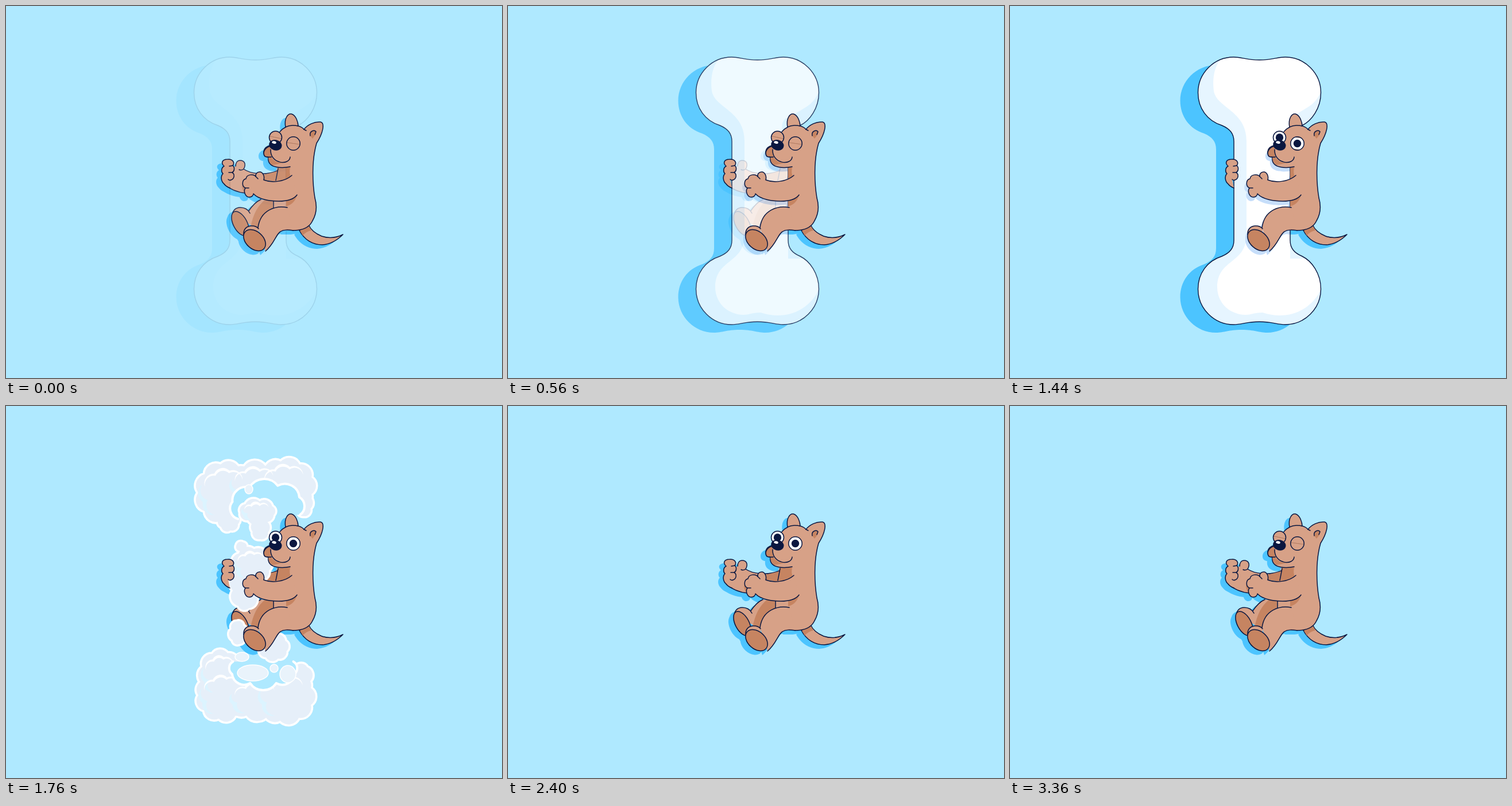
An HTML page for the animation above (3.44 s loop, 864 px wide and 648 px high).

```html
<!DOCTYPE html>
<html lang="en">
<head>
<meta charset="utf-8">
<title>Dog and bone</title>
<style>
html, body { margin: 0; width: 100%; height: 100%; overflow: hidden; background: #afe9ff; }
svg { display: block; width: 864px; height: 648px; }
</style>
</head>
<body>
<svg id="stage" viewBox="0 0 864 648" stroke-linecap="round" stroke-linejoin="round"></svg>
<script>
const LOOP = 3440, STEP = 80;
const SKY = '#afe9ff', INK = '#0a1740', SKIN = '#d7a187', DARK = '#c68461', SHADE = '#4cc4ff', MIST = '#e6eff9';
const stage = document.getElementById('stage');

function add(parent, tag, attrs = {}) {
  const node = document.createElementNS('http://www.w3.org/2000/svg', tag);
  for (const key in attrs) node.setAttribute(key, attrs[key]);
  parent.appendChild(node);
  return node;
}
const group = (parent, attrs) => add(parent, 'g', attrs);
const fill = (parent, d, color) => add(parent, 'path', { d, fill: color });
const line = (parent, d, width = 1.5, color = INK) =>
  add(parent, 'path', { d, fill: 'none', stroke: color, 'stroke-width': width });
const oval = (parent, cx, cy, rx, ry, color, turn = 0, stroke = 'none') =>
  add(parent, 'ellipse', { cx, cy, rx, ry, fill: color, stroke, 'stroke-width': 1.5, transform: `rotate(${turn} ${cx} ${cy})` });

// A part is outlined along its strokes; its fill bridges the gaps between them
const solid = d => d.replace(/(?!^)M/g, 'L');
function part(parent, d) {
  fill(parent, solid(d), SKIN);
  line(parent, d);
}

const tail = 'M511,391C520,408 535,416 551,416C566,415 578,407 587,398C575,404 562,405 550,401C538,396 530,388 527,381Z';
const ear = 'M487,211C484,196 491,187 497,188C505,190 509,202 509,210';
const body = 'M477,219C484,211 492,208 499,208C508,208 515,210 519,215C525,207 537,201 548,202C556,204 552,222 541,239'
  + 'C532,270 534,310 538,334C542,348 541,362 534,374C528,387 515,391 500,391M488,391M488,297'
  + 'M495,280C485,282 454,285 457,263M462,263C454,264 448,261 449,253C450,247 455,244 461,243';
const arm = 'M498,295C485,307 462,308 449,303C451,296 447,289 442,289C437,289 434,293 435,297C431,292 419,293 418,301'
  + 'C411,302 410,314 417,317C413,323 417,333 424,333C428,333 431,330 431,327C440,337 460,340 475,340C490,340 502,336 507,329';
const leg = 'M490,351C470,347 443,355 439,386M452,427C467,415 470,398 478,393C484,389 492,390 500,391';
const foot = 'M414,399C413,388 420,383 428,383C433,383 437,384 440,388M445,400';
const farArm = 'M473,287C452,296 425,292 414,284C419,275 415,269 408,269C403,269 400,273 400,279M388,285M380,310C392,321 406,325 418,326';
const palm = 'M390,317C387,316 383,314 380,310C375,306 373,297 378,292C375,290 374,282 380,279C374,274 376,267 386,267'
  + 'C395,266 399,273 395,278C399,281 398,288 394,290C399,293 398,301 392,303C390,304 388,303 387,302';
const farLeg = 'M422,358C428,349 435,341 444,337M466,340V353M440,390M408,370';
const farFoot = 'M394,370C393,356 400,351 408,351C416,351 422,355 425,361M420,385M414,403';
const sole = [433, 408, 22, 15], farSole = [408, 379, 23, 12];

// Bone from one quarter, mirrored both ways; the shaft sits a little to the right
const quarter = [[0, 228], [23, 228], [30, 233], [45, 233], [79, 233], [107, 205], [107, 171],
  [107, 144], [91, 122], [70, 114], [56, 108], [49, 100], [49, 86]];
const bone = [[1, -1], [1, 1], [-1, 1], [-1, -1]].map(([sx, sy], i) => {
  const pts = quarter.map(([x, y]) => [434.5 + sx * x + (y < 116 ? 4.5 : 0), 322 + sy * y]);
  if (i % 2) pts.reverse();
  return (i ? 'L' : 'M') + pts[0] + 'C' + pts.slice(1).join(' ');
}).join('') + 'Z';
const gleam = 'M374,86C356,100 352,125 355,148C360,178 412,182 412,235V398C412,450 361,440 361,490'
  + 'C361,515 380,537 410,538C420,538 425,534 440,534C490,550 530,525 544,488V440H488V215C484,175 535,190 544,138V80Z';

const defs = add(stage, 'defs');
const clip = (id, tag, attrs) => add(add(defs, 'clipPath', { id }), tag, attrs);
clip('inBone', 'path', { d: bone });

// Shadow of the whole character
const cast = group(stage, { transform: 'translate(-9 7)' });
for (const d of [tail, ear, body, arm, leg, foot, farArm, palm, farLeg, farFoot]) fill(cast, solid(d), SHADE);
oval(cast, ...sole, SHADE, 42);
oval(cast, ...farSole, SHADE, 62);

// Parts behind the bone
const rear = group(stage);
part(rear, tail);
fill(rear, 'M512,391L527,382L532,391Q522,393 517,400Z', DARK);
fill(rear, 'M473,280H500V355H466V300Z', SKIN);
fill(rear, 'M474,280H495V298Q485,305 471,305Z', DARK);
part(rear, farLeg);
fill(rear, 'M426,386Q432,352 452,337H465V352Q445,358 439,386Z', DARK);
part(rear, farFoot);
oval(rear, ...farSole, DARK, 62, INK);
part(rear, farArm);
fill(rear, 'M449,294L472,288L470,306L449,303Z', DARK);
fill(rear, 'M418,302Q406,312 415,324H422Z', DARK);
line(rear, 'M474,283L470,304M414,284Q410,287 406,285');

// Bone, fading as one piece
const boneLayer = group(stage);
add(boneLayer, 'path', { d: bone, fill: SHADE, transform: 'translate(-31 14)' });
fill(boneLayer, bone, '#e6f5ff');
const inside = group(boneLayer, { 'clip-path': 'url(#inBone)' });
fill(inside, gleam, '#fff');
const soft = group(inside, { transform: 'translate(-4 7)' });
for (const d of [body, leg, foot, arm]) fill(soft, solid(d), '#c6defa');
oval(soft, ...sole, '#c6defa', 42);
line(boneLayer, bone, 1.4);

const burst = group(stage), wisps = group(stage);

// Parts in front of the bone
const front = group(stage);
part(front, palm);
line(front, 'M395,278L389,279M394,290L388,290');
part(front, ear);
part(front, body);
fill(front, 'M488,282H495Q493,290 496,297L488,302Z', DARK);
fill(front, 'M488,339L507,329Q503,345 488,349Z', DARK);
part(front, leg);
part(front, foot.replace('M445', 'M440'));
oval(front, ...sole, DARK, 42, INK);
part(front, arm);
line(front, 'M435,297L439,301M417,317L423,317');
fill(front, 'M530,226C528,218 537,215 540,219Q541,223 534,231Z', DARK);
line(front, 'M530,226C528,218 537,215 540,219L538,224M519,215L523,217');

// Eyes with two lids that part along a slanted seam
const lids = [];
function eye(id, cx, cy, r, turn) {
  clip(id, 'circle', { cx, cy, r });
  const ball = group(front, { 'clip-path': `url(#${id})` });
  oval(ball, cx, cy, r, r, '#fff');
  oval(ball, cx, cy, 6.7, 6.7, INK);
  const slant = group(ball, { transform: `translate(${cx} ${cy}) rotate(${turn})` });
  for (const side of [-1, 1]) {
    const node = add(slant, 'rect', { x: -16, y: side < 0 ? -30 : 0, width: 32, height: 30, fill: SKIN, stroke: '#b37c62', 'stroke-width': .8 });
    lids.push({ node, side });
  }
  oval(front, cx, cy, r, r, 'none', 0, INK);
}
eye('farEye', 469.5, 229, 11, 12);
eye('nearEye', 500.5, 239.5, 11.7, 8);

// Muzzle
fill(front, 'M461,244C451,246 446,256 451,262L462,263Z', DARK);
fill(front, 'M457,263H462Q468,274 483,273Q470,276 464,277Q457,272 457,263Z', DARK);
fill(front, 'M461,246L477,247L479,258L466,266Q460,258 461,246Z', SKIN);
line(front, 'M461,244C451,246 446,256 451,262Q455,264 462,263M461,250C460,276 494,278 495,263');
oval(front, 469.3, 242.3, 11.3, 9.2, INK, 15);
oval(front, 467, 237.6, 3.8, 2.3, '#fff', 12);

// Scalloped lobe: n bumps along an ellipse between two angles
function rimPoints(cx, cy, rx, ry, from, to, n, width = 0) {
  return Array.from({ length: n + 1 }, (_, i) => {
    const a = (from + (to - from) * i / n) * Math.PI / 180;
    const pull = Math.min(width * Math.sin(Math.PI * i / n), rx * .85);
    return [cx + (rx - pull) * Math.cos(a), cy + (ry - pull) * Math.sin(a)];
  });
}
const arcs = (points, sweep) => points.slice(1).map(([x, y], i) => {
  const r = Math.hypot(x - points[i][0], y - points[i][1]) * .6;
  return `A${r} ${r} 0 0 ${sweep} ${x} ${y}`;
}).join('');
function lobe(...shape) {
  const points = rimPoints(...shape);
  return 'M' + points[0] + arcs(points, 1);
}
function wisp([cx, cy, rx, ry, from, to, n], width, scale = 1) {
  const shape = [cx, cy, rx * scale, ry * scale, from, to, n];
  const inner = rimPoints(...shape, width).reverse();
  return lobe(...shape) + 'L' + inner[0] + arcs(inner, 0) + 'Z';
}

// First burst: joined lobes with a white rim, then the opening, then loose puffs
function cloud(lobes) {
  const d = lobes.map(([x, y, rx, ry, n]) => lobe(x, y, rx, ry, 20, 380, n)).join('');
  line(burst, d, 7, '#fff');
  fill(burst, d, MIST);
  for (const [x, y, rx, ry] of lobes) {
    if (rx < 30) continue;
    fill(burst, wisp([x, y, rx * .78, ry * .78, 195, 325, 3], 5), '#fff');
    fill(burst, wisp([x, y, rx * .9, ry * .85, 115, 200, 2], 9), '#dcf4ff');
  }
}
function opening(...shape) {
  const d = lobe(...shape);
  fill(burst, d, SKY);
  line(burst, d, 4, '#fff');
}
cloud([[382, 151, 47, 50, 9], [435, 138, 48, 36, 8], [487, 139, 48, 43, 9], [388, 200, 17, 17, 6], [519, 172, 12, 20, 5]]);
opening(455, 175, 62, 38, 145, 382, 5);
cloud([[374, 468, 34, 40, 8], [378, 504, 43, 41, 9], [436, 510, 50, 31, 8], [486, 506, 48, 43, 9], [514, 472, 17, 22, 5]]);
opening(448, 457, 58, 28, -25, 205, 5);
cloud([[438, 184, 30, 18, 7], [443, 214, 14, 18, 5]]);
cloud([[428, 277, 32, 28, 7], [416, 318, 21, 36, 7], [410, 245, 9, 8, 4]]);
cloud([[404, 395, 12, 20, 6], [466, 420, 24, 21, 7]]);
for (const b of [[423, 145, 7, 8], [411, 437, 12, 8], [430, 465, 27, 14], [467, 457, 7, 7], [491, 467, 14, 15]])
  oval(burst, ...b, '#e9f3fb', 0, '#fff');

// Thinning wisps: centre, radii, angles, bumps, width
const strands = [
  [382, 158, 59, 73, 80, 325, 9, 12], [497, 140, 51, 57, 210, 422, 7, 12],
  [455, 195, 32, 44, -115, 0, 3, 8], [435, 212, 31, 28, 70, 215, 4, 8],
  [372, 512, 56, 55, 85, 235, 5, 11], [485, 505, 59, 60, -30, 135, 6, 11],
  [400, 257, 20, 21, 130, 265, 2, 8], [400, 348, 25, 32, 90, 245, 3, 8],
  [430, 287, 13, 14, 180, 360, 2, 8], [434, 349, 17, 14, -25, 100, 2, 6],
  [483, 420, 20, 27, -70, 95, 3, 9], [428, 468, 27, 23, 60, 200, 3, 9]
].map(shape => ({ shape, width: shape.pop(), main: fill(wisps, '', '#fff'), rim: fill(wisps, '', MIST) }));

const bits = [];
function bit(x, y) {
  const g = group(wisps);
  bits.push({ g, x, y });
  return g;
}
for (const [x, y, r, turn] of [[370, 163, 9, -70], [391, 130, 9, 35], [477, 128, 9, 60], [503, 138, 8, 100], [451, 209, 10, 120],
  [366, 486, 9, 235], [355, 520, 9, 80], [351, 545, 9, 225], [396, 518, 15, 225], [448, 509, 10, 130], [503, 479, 11, 120],
  [497, 535, 14, 140], [386, 408, 14, 250], [355, 437, 9, -30], [462, 436, 9, 160], [472, 292, 11, 100]]) {
  const d = `M${-r},0A${r} ${r} 0 0 1 ${r},0A${r * 1.4} ${r * 1.4} 0 0 0 ${-r},0Z`;
  add(bit(x, y), 'path', { d, fill: '#fff', transform: `rotate(${turn})` });
}
for (const [x, y, r] of [[354, 137, 7], [363, 121, 4], [516, 143, 4], [424, 146, 2], [451, 138, 2], [431, 167, 2],
  [428, 520, 4], [374, 441, 4], [529, 450, 4], [412, 436, 2], [405, 308, 2], [567, 275, 1]])
  oval(bit(x, y), 0, 0, r, r * .8, '#f2f8fe', -15);

const clamp = v => Math.max(0, Math.min(1, v));
const ease = v => { v = clamp(v); return v * v * (3 - 2 * v); };
const show = (node, on) => node.setAttribute('display', on ? 'inline' : 'none');

function draw(now) {
  const t = Math.floor(now % LOOP / STEP) * STEP;
  boneLayer.setAttribute('opacity', t < 1760 ? clamp((t + 80) / 800) : 0);

  const open = ease((t - 1120) / 480) - ease((t - 2800) / 400);
  for (const { node, side } of lids) node.setAttribute('transform', `translate(0 ${side * 14 * open})`);

  const k = (t - 1760) / 480, drifting = k > 0 && k < 1;
  show(burst, k === 0);
  show(wisps, drifting);
  if (!drifting) return;
  const thin = 2.2 * ((1 - k) / .833) ** 3;
  const scale = 1.08 - .18 * (1 - k) ** 2;
  for (const { shape, width, main, rim } of strands) {
    main.setAttribute('d', wisp(shape, width * thin, scale));
    rim.setAttribute('d', wisp(shape, width * thin * .6, scale));
  }
  const size = Math.min(1.3, thin);
  for (const { g, x, y } of bits) g.setAttribute('transform', `translate(${x} ${y}) scale(${size})`);
}

const start = performance.now();
function tick() {
  draw(performance.now() - start);
  requestAnimationFrame(tick);
}
tick();
</script>
</body>
</html>
```
